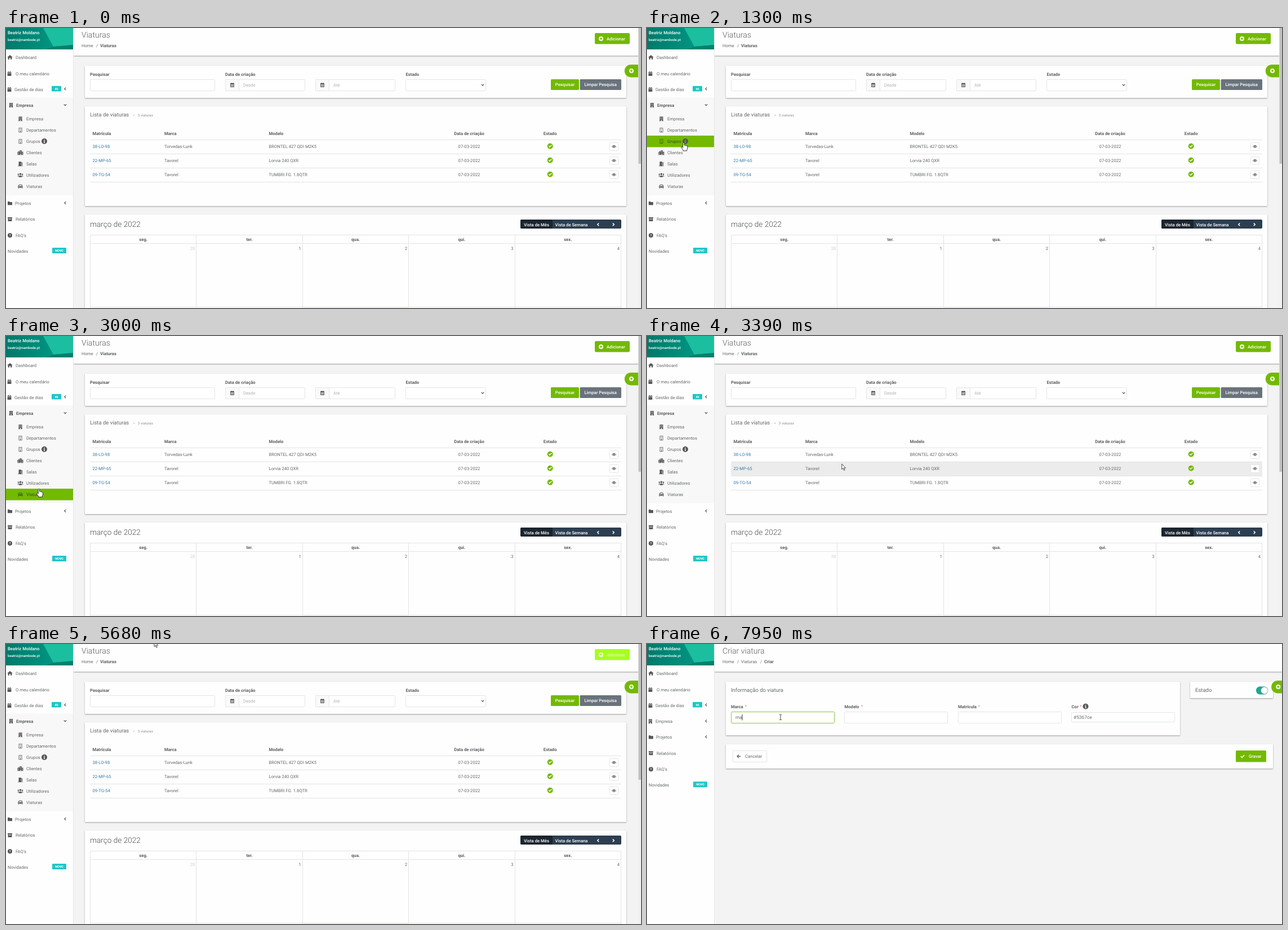
An HTML page for the animation above (8000 ms loop, 1127x497 px).

```html
<!DOCTYPE html>
<html lang="pt">
<head>
<meta charset="utf-8">
<title>Viaturas</title>
<style>
html, body { margin: 0; width: 100%; height: 100%; overflow: hidden; background: #f3f3f3; }
svg { display: block; width: 1127px; height: 497px; font: 7.7px Roboto, Arial, sans-serif; }
text { fill: #66696b; white-space: pre; text-rendering: geometricPrecision; }
.b { font-weight: 700; fill: #5c5f61; }
.w { font-weight: 500; fill: #fff; }
.title { font-size: 14.1px; font-weight: 300; fill: #5a5d5f; }
.month { font-size: 13.6px; font-weight: 300; fill: #4c4f51; }
.head { font-size: 9.5px; }
.small { font-size: 6.2px; fill: #8a8d8f; }
.mail { font-size: 6.1px; }
.badge { font-size: 5.4px; font-weight: 700; fill: #fff; }
.hint { fill: #aeb1b3; }
.pale { fill: #d0d0d0; }
.link { fill: #3a7ca8; }
.value { font-size: 8.4px; }
.star { font-size: 6.5px; fill: #e8554e; }
.mid { text-anchor: middle; }
.end { text-anchor: end; }
.card { fill: #fefefe; filter: drop-shadow(0 1px 1px rgba(0,0,0,.36)); }
.field { fill: #fff; stroke: #e3e5e7; }
.addon { fill: #fafafa; stroke: #e3e5e7; }
.focus { stroke: #8cc63f; }
.green { fill: #73b900; }
.teal { fill: #22c5c7; }
.line { stroke: #e4e4e4; fill: none; }
.ic { fill: #565656; fill-rule: evenodd; }
.ic.stroke { fill: none; stroke: #565656; stroke-width: 1.2; }
.ic.white { fill: #fff; }
.ic.stroke.white { fill: none; stroke: #fff; stroke-width: 1.5; }
.ic.lime { fill: #73b900; }
.bar { fill: none; }
.sub.on .bar { fill: #73b900; }
.sub.on text { fill: #41651a; font-weight: 500; }
.sub.on .ic { fill: #41651a; }
.row.on .bar { fill: #ececec; }
.bright .add rect { fill: #a6ff1f; }
.bright .add text { fill: #e3ffb4; }
.bare text, .bare .ic { visibility: hidden; }
</style>
</head>
<body>
<svg id="stage" viewBox="0 0 1127 497"></svg>
<script>
const paths = {
  home: 'M-4.8 0L0-4L4.8 0H3.4V3.8H1V1H-1V3.8H-3.4V0Z',
  cal: 'M-3.4-3H-2V-4H-1V-3H1V-4H2V-3H3.4V-1.5H-3.4ZM-3.4-.8H3.4V4H-3.4Z',
  grid: 'M-3.4-3H-2V-4H-1V-3H1V-4H2V-3H3.4V4H-3.4ZM-2.4-1H-1V.4H-2.4ZM-.6-1H.7V.4H-.6ZM1.2-1H2.5V.4H1.2ZM-2.4 1.2H-1V2.7H-2.4ZM-.6 1.2H.7V2.7H-.6ZM1.2 1.2H2.5V2.7H1.2Z',
  bld: 'M-3-4H3V3.4H3.5V4H-3.5V3.4H-3ZM-1.8-2.8V-1.8H-.6V-2.8ZM.6-2.8V-1.8H1.8V-2.8ZM-1.8-.8V.2H-.6V-.8ZM.6-.8V.2H1.8V-.8ZM-.7 1.6V4H.7V1.6Z',
  outline: 'M-3-4H3V4H-3ZM-2.3-3.3V3.3H-.7V1.6H.7V3.3H2.3V-3.3ZM-1.5-2.5H-.5V-1.6H-1.5ZM.5-2.5H1.5V-1.6H.5ZM-1.5-.6H-.5V.3H-1.5ZM.5-.6H1.5V.3H.5Z',
  city: 'M-5-1.5H-3V-3.5H-2V-1.5H-1V-4H2.4V-1.5H5V4H-5ZM-3.6 0V1H-2.5V0ZM-3.6 2V3H-2.5V2ZM.2-2.5V-1.5H1.2V-2.5ZM.2-.3V.8H1.2V-.3ZM.2 2V4H1.2V2ZM3 0V1H4V0ZM3 2V3H4V2Z',
  door: 'M-3-4H1.6V3.2H4.4V4H-4.4V3.2H-3ZM2.2-3H3.6V2.6H2.2ZM0-.5V.6H1V-.5Z',
  users: 'M-1.8-2A1.8 1.8 0 1 1 1.8-2A1.8 1.8 0 1 1-1.8-2ZM-2.8 3.6Q-2.8.6 0 .6T2.8 3.6ZM-4.8-1.4A1.2 1.2 0 1 1-2.4-1.4A1.2 1.2 0 1 1-4.8-1.4ZM2.4-1.4A1.2 1.2 0 1 1 4.8-1.4A1.2 1.2 0 1 1 2.4-1.4ZM-5 2.4Q-5 .2-2.6.3L-3.3 2.4ZM5 2.4Q5 .2 2.6.3L3.3 2.4Z',
  car: 'M-4-.4L-2.6-3.2H2.6L4-.4V3.4H2.6V2.2H-2.6V3.4H-4ZM-2-2.2L-2.7-.4H2.7L2-2.2ZM-3 .5V1.4H-1.7V.5ZM1.7.5V1.4H3V.5Z',
  folder: 'M-4-3H-1L0-2H4V3.2H-4Z',
  box: 'M-4-3.5H4V-1.6H-4ZM-3.5-1H3.5V3.5H-3.5ZM-1.2-.2V.6H1.2V-.2Z',
  plus: 'M-4 0A4 4 0 1 1 4 0A4 4 0 1 1-4 0ZM-.7-2.3V-.7H-2.3V.7H-.7V2.3H.7V.7H2.3V-.7H.7V-2.3Z',
  info: 'M-5 0A5 5 0 1 1 5 0A5 5 0 1 1-5 0ZM-.8-3V-1.6H.8V-3ZM-1.2-.8V.2H-.6V2H-1.2V3H1.2V2H.7V-.8Z',
  ok: 'M-5 0A5 5 0 1 1 5 0A5 5 0 1 1-5 0ZM-3 .2L-.8 2.4L3.2-1.6L2.2-2.6L-.8.4L-2-.8Z',
  eye: 'M-4 0Q0-4.6 4 0Q0 4.6-4 0ZM-2.9 0Q0 3.2 2.9 0Q0-3.2-2.9 0ZM-1.3 0A1.3 1.3 0 1 1 1.3 0A1.3 1.3 0 1 1-1.3 0Z',
  left: 'M1.2-2.4L-1.2 0L1.2 2.4',
  right: 'M-1.2-2.4L1.2 0L-1.2 2.4',
  down: 'M-2.2-1L0 1.2L2.2-1',
  back: 'M3.4 0H-3M0-3L-3 0L0 3',
  tick: 'M-3.2 0L-1 2.3L3.4-2.3'
};

const text = (x, y, s, cls = '') => `<text x="${x}" y="${y}" dy=".355em" class="${cls}">${s}</text>`;
const icon = (x, y, name, cls = '') => `<path class="ic ${cls}" d="${paths[name]}" transform="translate(${x} ${y})"/>`;
const rect = (x, y, w, h, cls, r = 0) => `<rect x="${x}" y="${y}" width="${w}" height="${h}" rx="${r}" class="${cls}"/>`;
const field = (x, y, w, h, cls = 'field') => rect(x + .5, y + .5, w - 1, h - 1, cls, 1);
const line = d => `<path class="line" d="${d}"/>`;
const each = (list, fn) => list.map(fn).join('');
const chevron = (x, y, dir, cls = '') => icon(x, y, dir, 'stroke ' + cls);

const fab = `<path class="green" d="M1122 65H1109A11.2 11.2 0 0 0 1109 87.4H1122Z"/>` + icon(1110, 76, 'plus', 'white');

const subs = [['Empresa', 'bld'], ['Departamentos', 'outline'], ['Grupos', 'outline'], ['Clientes', 'city'],
  ['Salas', 'door'], ['Utilizadores', 'users'], ['Viaturas', 'car']];

const sidebar = `
  <rect width="119" height="497" fill="#fefefe"/>
  <rect x="119" width="1" height="497" fill="#e6e6e6"/>
  <rect width="119" height="38" fill="url(#teal)"/>
  <path d="M66 0H119V30L84 33Z" fill="#1bbf9f"/>
  <path d="M84 33L119 30V38H70Z" fill="#00806f"/>` +
  text(3, 8, 'Beatriz Moldano', 'w') + text(3, 20.5, 'beatriz@nambode.pt', 'w mail') +
  icon(7, 52, 'home') + text(17, 52, 'Dashboard') +
  icon(6, 81, 'cal') + text(17, 81, 'O meu calendário') +
  icon(6, 109, 'cal') + text(15, 109, 'Gestão de dias') +
  rect(81, 103, 17, 9.5, 'teal', 1) + text(89.5, 107.8, '46', 'badge mid') + chevron(105, 108, 'left');

const openMenu = rect(0, 123, 119, 174, '" fill="#f8f8f8') +
  icon(9, 137, 'bld') + text(18, 137.3, 'Empresa', 'b') + chevron(105, 136.5, 'down') +
  each(subs, ([name, ic], i) => {
    const y = 161.2 + i * 20;
    return `<g class="sub">${rect(0, 151 + i * 20, 119, 20.5, 'bar')}${icon(25.5, y, ic)}${text(36, y, name)}</g>`;
  }) + icon(68, 201, 'info');

const closedMenu = icon(6, 137.3, 'bld') + text(15, 137.5, 'Empresa') + chevron(105, 136.8, 'left');

const lowMenu = icon(7, 311, 'folder') + text(16, 311.3, 'Projetos') + chevron(105, 310.5, 'left') +
  icon(7, 339.5, 'box') + text(17, 339.6, 'Relatórios') +
  `<circle class="ic" cx="7" cy="368" r="4"/>` + text(7, 368, '?', 'badge mid') + text(17, 368, 'FAQ\'s') +
  text(3, 396.2, 'Novidades') + rect(82, 390, 25, 10, 'teal', 1) + text(94.5, 395.2, 'NOVO', 'badge mid');

const header = (title, trail) => `<rect x="120" width="1007" height="49" class="card"/>` + text(134, 11.5, title, 'title') +
  text(134, 31.3, 'Home') + text(160, 31.3, '/') + trail;

const cars = [['38-LO-98', 'Torvedas-Lunk', 'BRONTEL 427 QDI M2K5'],
  ['22-MP-65', 'Tavorel', 'Lorvia 240 QXR'], ['09-TG-54', 'Tavorel', 'TUMBRI FG. 1.8QTR']];
const days = ['seg.', 'ter.', 'qua.', 'qui.', 'sex.'];
const colX = i => 149.5 + i * 188.4;

const dateField = (x, hint) => field(x, 91, 142, 21) + field(x, 91, 25, 21, 'addon') +
  icon(x + 12.5, 101, 'grid') + text(x + 32, 101, hint, 'hint');

const listPage = header('Viaturas', text(167, 31.3, 'Viaturas', 'b')) +
  `<g class="add">${rect(1045, 9, 62, 19.5, 'green', 2)}${icon(1056, 19, 'plus', 'white')}${text(1066, 19, 'Adicionar', 'w')}</g>` +
  rect(140, 67, 961, 57, 'card', 1) +
  text(149, 82, 'Pesquisar', 'b') + text(389, 82, 'Data de criação', 'b') + text(709.5, 82, 'Estado', 'b') +
  field(149, 91, 222, 21) + dateField(389, 'Desde') + dateField(549, 'Até') +
  field(709, 91, 143, 21) + chevron(846, 101, 'down') +
  rect(967, 91, 50, 19, 'green', 1.5) + text(992, 100.7, 'Pesquisar', 'w mid') +
  rect(1018.5, 91, 73.5, 19, '" fill="#6a737c', 1.5) + text(1055.2, 100.7, 'Limpar Pesquisa', 'w mid') +
  rect(140, 139, 961, 177, 'card', 1) +
  text(149, 153.8, 'Lista de viaturas', 'head') + `<circle cx="227.3" cy="154.8" r=".9" fill="#aaa"/>` + text(234, 155, '3 viaturas', 'small') +
  text(153.5, 187, 'Matrícula', 'b') + text(281, 187, 'Marca', 'b') + text(466.5, 187, 'Modelo', 'b') +
  text(822, 187, 'Data de criação', 'b mid') + text(965.7, 187, 'Estado', 'b mid') +
  each(cars, ([plate, make, model], i) => {
    const y = 210.2 + i * 25;
    return `<g class="row">${rect(149, 198 + i * 25, 943, 25, 'bar')}` + text(153.5, y, plate, 'link') +
      text(281, y, make) + text(466.5, y, model) + text(822, y, '07-03-2022', 'mid') +
      icon(965.7, y - .4, 'ok', 'lime') + field(1071, 203 + i * 25, 16, 15) + icon(1079, y + .2, 'eye') + '</g>';
  }) + line('M149 198.5H1092M149 223.5H1092M149 248.5H1092M149 273.5H1092') +
  rect(140, 331, 961, 180, 'card', 1) + text(149, 347.8, 'março de 2022', 'month') +
  rect(913, 340, 179, 16, '" fill="#2c3e50', 2) + rect(913, 340, 57, 16, '" fill="#1a252f', 2) +
  text(941.5, 349, 'Vista de Mês', 'w mid') + text(1003.5, 349, 'Vista de Semana', 'w mid') +
  chevron(1051, 348.8, 'left', 'white') + chevron(1078, 348.8, 'right', 'white') +
  line('M149 367.5H1092M149 382.5H1092M149 495.5H1092') + rect(526, 496, 188, 1, '" fill="#f7f3c8') +
  each([0, 1, 2, 3, 4, 5], i => line(`M${Math.floor(colX(i)) + .5} 367V497`)) +
  each(days, (d, i) => text(colX(i) + 94.2, 375.3, d, 'b mid') +
    text(colX(i + 1) - 2.5, 390.8, i || 28, i ? 'end' : 'end pale')) +
  rect(1122, 0, 5, 497, '" fill="#f1f1f1') + rect(1122.5, 0, 4.5, 241, '" fill="#c1c1c1') + fab;

const labels = [[149, 'Marca', 174], [350.5, 'Modelo', 380], [552, 'Matrícula', 588], [753.5, 'Cor', 768.5]];

const createPage = header('Criar viatura', text(167, 31.3, 'Viaturas') + text(201, 31.3, '/') + text(208, 31.3, 'Criar', 'b')) +
  rect(140, 67, 806, 95, 'card', 1) + rect(964, 67, 147, 29, 'card', 1) + rect(140, 178, 971, 43, 'card', 1) +
  text(149, 82, 'Informação do viatura', 'head') + text(973, 82, 'Estado', 'head') +
  each(labels, ([x, name, end]) => text(x, 111, name, 'b') + text(end, 111, '*', 'star')) + icon(778.5, 110.8, 'info') +
  `<g id="make">${field(149, 120, 184, 21)}</g>` + field(350, 120, 184, 21) + field(552, 120, 184, 21) +
  field(753, 121, 184, 18) + text(757, 129.7, '#5367ce', 'value') +
  `<g id="typed">${text(157, 130, '', 'value')}</g><rect id="caret" y="125" width="1" height="10.5" fill="#333"/>` +
  field(152, 189, 61, 21) + icon(163, 199.3, 'back', 'stroke') + text(174, 199.3, 'Cancelar') +
  rect(1045, 189, 54, 20.5, 'green', 1.5) + icon(1057, 199.2, 'tick', 'stroke white') + text(1068, 199.3, 'Gravar', 'w') +
  `<rect x="1081.5" y="76" width="20.5" height="13" rx="6.5" fill="#fff" stroke="#dfdfdf" stroke-width=".8"/>
   <rect id="fill" x="1081" y="75.6" width="21.3" height="13.8" rx="6.9" fill="#1aa88f"/>
   <circle id="knob" cy="82.5" r="6" fill="#fff" stroke="#c8c8c8" stroke-width=".5"/>` +
  `<g transform="translate(10.3 0)">${fab}</g>`;

const pointers = `
  <path id="arrow" d="M0 0V9.6L2.2 7.7L3.8 11.4L5.3 10.7L3.8 7.2H6.8Z" fill="#fff" stroke="#222" stroke-width=".8"/>
  <path id="hand" d="M-1.2 1Q0-.8 1.2 1V5Q2.4 4 3.2 5.4Q4.4 4.6 5.2 5.9Q6.8 5.4 7 7V10Q7 12 5.8 13.2V14.8H-.8V13.4L-3.8 9.4Q-4.6 7.6-3 7.4L-1.2 9Z" fill="#fff" stroke="#222" stroke-width=".9"/>
  <path id="beam" d="M-2-4.5H-.6Q0-4.5 0-3.8V3.8Q0 4.5-.6 4.5H-2M2-4.5H.6Q0-4.5 0-3.8M0 3.8Q0 4.5.6 4.5H2" fill="none" stroke="#333" stroke-width=".9"/>`;

const stage = document.getElementById('stage');
stage.innerHTML = `<defs><linearGradient id="teal"><stop stop-color="#00796b"/><stop offset="1" stop-color="#00a08a"/></linearGradient></defs>
  <rect width="1127" height="497" fill="#f3f3f3"/>
  <g id="list">${listPage}</g><g id="create">${createPage}</g>${sidebar}
  <g id="open">${openMenu}</g><g id="closed">${closedMenu}</g><g id="low">${lowMenu}</g>
  <g id="pointer">${pointers}</g>`;

// Bursts of pointer motion: start, end, number of steps
const bursts = [[230, 760, 8], [1010, 1770, 11], [1840, 2010, 3], [2160, 2160, 1], [3000, 3540, 8], [3720, 4270, 8],
  [4420, 5220, 11], [5300, 5370, 2], [5600, 5680, 2], [5830, 5830, 1], [5990, 6780, 11]];

// Pointer path: time, x, y
const track = [[230, 330, 292], [306, 235, 262], [382, 165, 228], [455, 118, 192], [530, 95, 169.5], [760, 92, 165],
  [934, 92, 165], [1770, 17.5, 270], [2010, 28, 274.5], [2160, 28, 275.5], [2924, 28, 275.5], [3154, 120, 262],
  [3386, 346, 227], [3540, 390, 212], [3641, 390, 212], [3877, 444, 195.5], [4270, 892, 94], [4340, 892, 94],
  [4700, 990, 62], [5060, 1060, 26], [5220, 1079, 18], [5300, 1028, 6], [5370, 1000, -20], [5600, 256, -5],
  [5680, 263, -5], [5911, 263, -5], [6300, 255, 70], [6780, 237, 130]];

const slack = 12;
const $ = id => document.getElementById(id);
const show = (id, on) => { $(id).style.display = on ? '' : 'none'; };
const clamp = v => Math.min(1, Math.max(0, v));
const within = (x, y, l, t, r, b) => x >= l && x < r && y >= t && y < b;
const subEls = [...document.querySelectorAll('.sub')];
const rowEls = [...document.querySelectorAll('.row')];

function stepTime(t) {
  const burst = bursts.filter(b => b[0] <= t).pop();
  if (!burst) return 0;
  const [start, end, n] = burst;
  const dt = (end - start) / Math.max(1, n - 1) || 1;
  return Math.min(end, start + Math.floor((t - start + slack) / dt) * dt);
}

function pointAt(q) {
  const i = track.findIndex(k => k[0] >= q);
  if (i < 0) return track[track.length - 1].slice(1);
  if (i === 0) return track[0].slice(1);
  const [a, b] = [track[i - 1], track[i]];
  const p = (q - a[0]) / (b[0] - a[0]);
  return [a[1] + (b[1] - a[1]) * p, a[2] + (b[2] - a[2]) * p];
}

function render(t) {
  const q = stepTime(t);
  const [x, y] = pointAt(q);
  const seen = q >= 230 && (q < 5365 || q >= 5600);
  const creating = t >= 5830;

  show('list', !creating);
  show('open', !creating);
  show('create', creating);
  show('closed', creating);
  $('low').setAttribute('transform', `translate(0 ${creating ? -145.7 : 0})`);
  stage.classList.toggle('bare', creating && t < 5990);
  stage.classList.toggle('bright', q >= 5050);

  const inMenu = seen && within(x, y, 0, 151, 119, 291);
  const inTable = seen && within(x, y, 149, 198, 1092, 273);
  subEls.forEach((el, i) => el.classList.toggle('on', inMenu && Math.floor((y - 151) / 20) === i));
  rowEls.forEach((el, i) => el.classList.toggle('on', inTable && Math.floor((y - 198) / 25) === i));

  const hand = !creating && (inMenu || within(x, y, 1045, 9, 1107, 29));
  const beam = creating && within(x, y, 149, 120, 333, 141);
  show('pointer', seen);
  show('hand', hand);
  show('beam', beam);
  show('arrow', !hand && !beam);
  $('pointer').setAttribute('transform', `translate(${x} ${y})`);

  const typed = t >= 7950 ? 'ma' : t >= 7720 ? 'm' : '';
  $('typed').firstChild.textContent = typed;
  $('caret').setAttribute('x', [156, 164.2, 168.5][typed.length]);
  show('caret', t >= 6870 && (t < 7340 || t >= 7720));
  $('make').firstChild.classList.toggle('focus', t >= 6870);

  const flip = clamp((t - 6700) / 400);
  $('fill').style.opacity = flip;
  $('knob').setAttribute('cx', 1088 + 7.8 * flip);
}

const begin = performance.now();
function tick() {
  render((performance.now() - begin) % 8000);
  requestAnimationFrame(tick);
}
tick();
</script>
</body>
</html>
```
